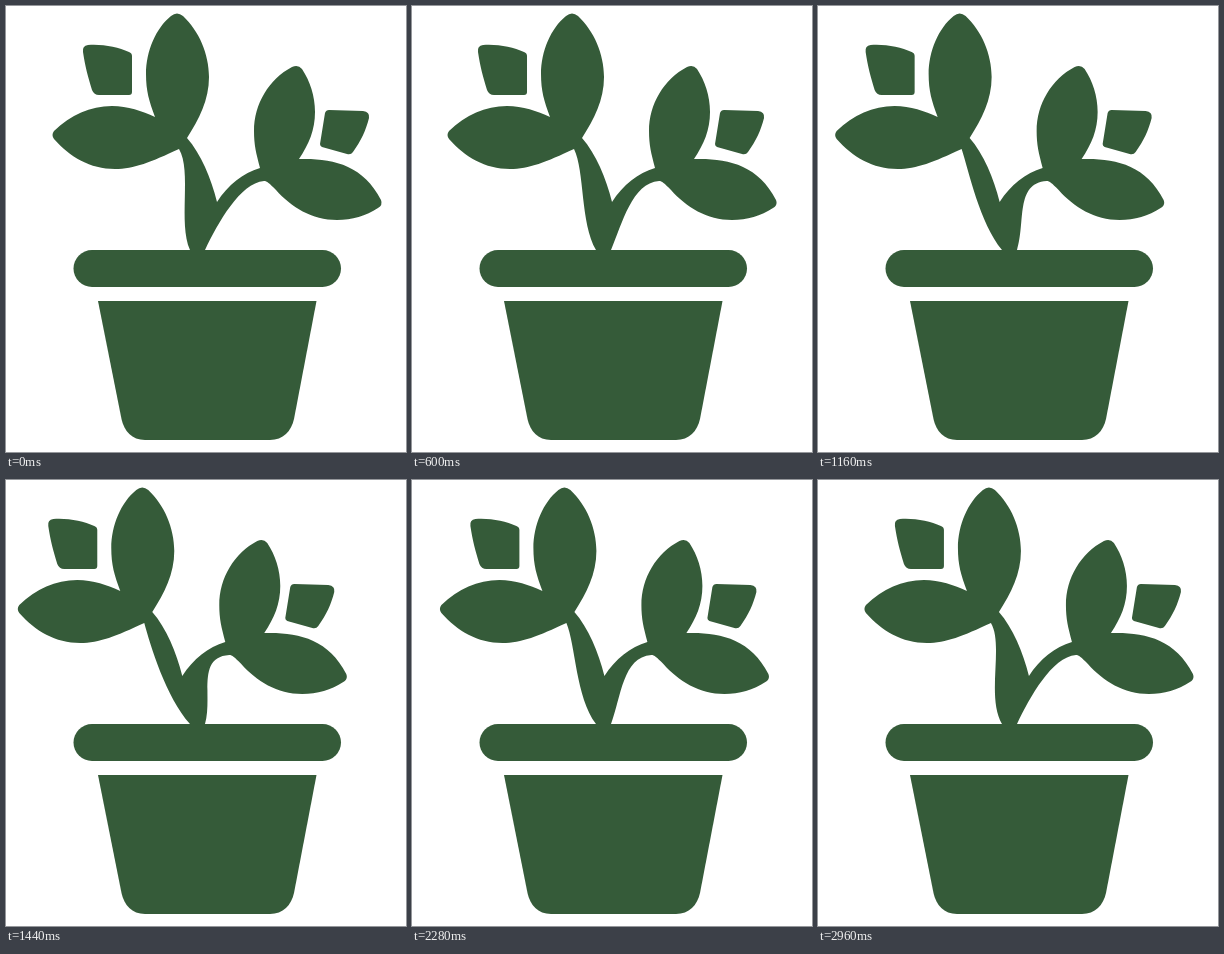
An HTML page for the animation above (3000 ms loop, 400 by 446 pixels).

```html
<!DOCTYPE html>
<html lang="en">
<head>
<meta charset="utf-8">
<title>Swaying plant</title>
<style>
  html, body { margin: 0; width: 100%; height: 100%; overflow: hidden; background: #fff; }
  svg { display: block; width: 100%; height: 100%; fill: #355b39; }
</style>
</head>
<body>
<svg viewBox="0 0 400 446">
  <g id="crown">
    <path d="M82 39C97 38 112 41 123 46Q126 47 126 50V86Q126 89 123 89H93Q88 89 86 84C82 71 79 60 77 46Q76 40 82 39Z"/>
    <path d="M323 104L357 105Q364 106 363 112C360 124 355 135 347 146Q345 149 341 148L316 141Q314 140 314 138L319 107Q320 104 323 104Z"/>
    <path id="plant"/>
  </g>
  <rect x="67.5" y="244" width="267.5" height="37" rx="18.5"/>
  <path d="M92 295H310.500L288 413C285.500 425 277 434 264 434H139C126 434 118 425 115.500 413Z"/>
</svg>
<script>
const LOOP = 3000, STEP = 40, TURN = 1600, SWAY = 35.6;
const crown = document.getElementById('crown');
const plant = document.getElementById('plant');

// Leaves and upper stem, from the left stem's top round to the right stem's underside
const leaves = 'M173 143C145 156 128 163 109 163C84 163 64 151 48 133Q45 129 48 125' +
  'C65 109 84 100 106 100C122 100 136 105 149 111' +
  'C143 95 140 85 140 68C140 45 150 22 165 10Q171 5 177 10' +
  'C193 25 203 48 203 71C203 94 193 113 181 132' +
  'C195 148 205 172 211 196C222 179 237 167 254 162' +
  'C250 147 248 139 248 125C248 98 263 73 286 61Q292 58 296 63' +
  'C304 75 309 90 309 106C309 124 303 138 293 153' +
  'C325 152 357 158 375 194Q377 199 372 202' +
  'C360 210 346 214 331 214C306 214 285 201 270 184C263 177 261 175 258 175';

const ease = p => (1 - Math.cos(Math.PI * p)) / 2;

function draw(t) {
  const out = t < TURN;
  const dx = -SWAY * (out ? ease(t / TURN) : 1 - ease((t - TURN) / (LOOP - TURN)));
  const x = (at, rate) => (at + rate * dx - dx).toFixed(2);
  // The stem's foot stays in the pot while its curves bend
  const low = out ? x(172, 0.35) : x(168, 0.235);
  plant.setAttribute('d', leaves +
    `C${x(234, 1.26)} 177 ${x(212, 0.147)} 217 ${x(199, 0)} 244` +
    `V246H${x(184, 0)}V244` +
    `C${low} 217 ${x(186, 1.2)} 165 173 143Z`);
  crown.setAttribute('transform', `translate(${dx.toFixed(2)} 0)`);
}

const start = performance.now();
function tick() {
  const t = (performance.now() - start) % LOOP;
  draw(Math.floor(t / STEP) * STEP);
  requestAnimationFrame(tick);
}
tick();
</script>
</body>
</html>
```
